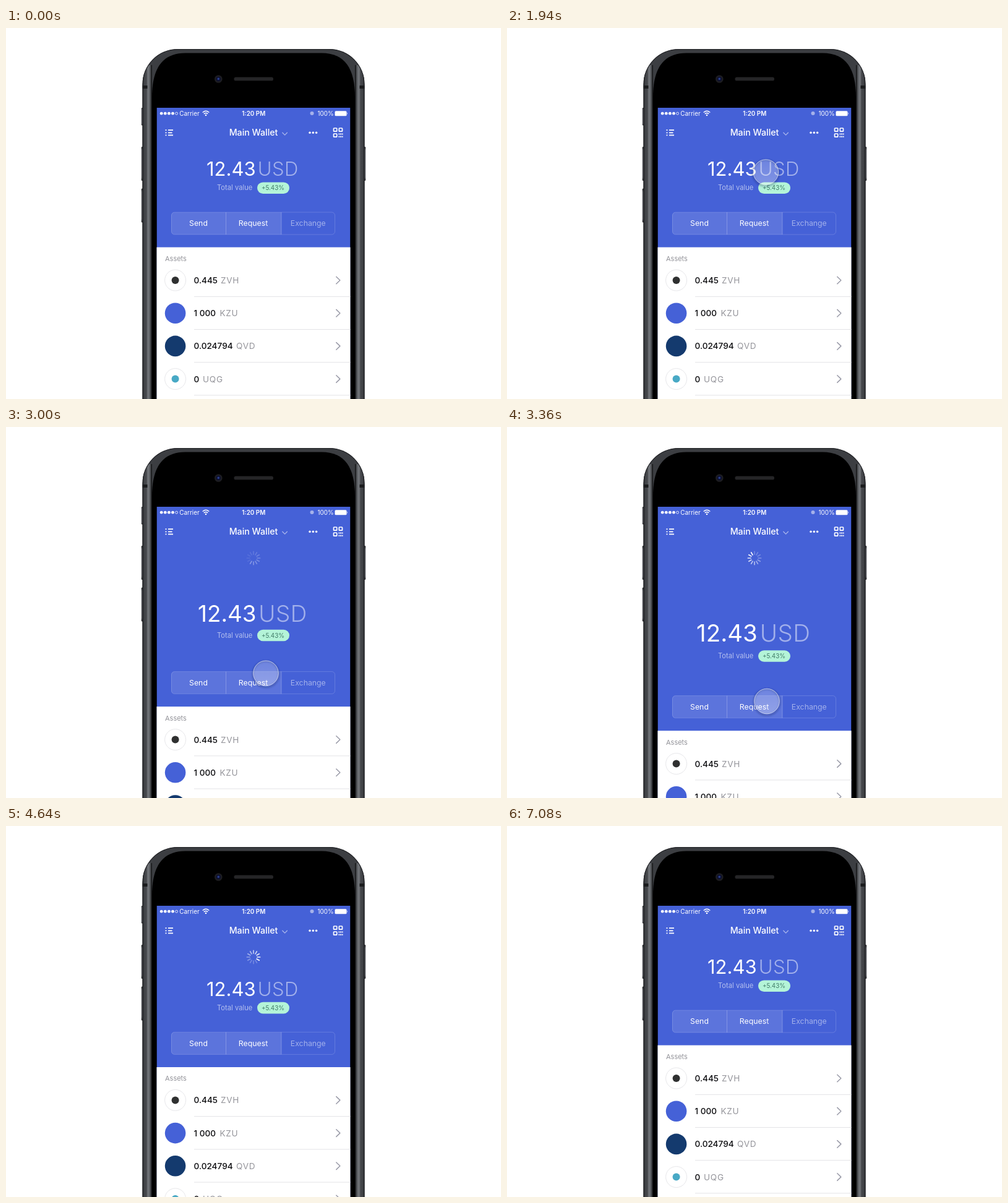
Animation of 800x600 px, one loop 7100 ms. Source, as an HTML page:

```html
<!DOCTYPE html>
<html lang="en">
<head>
<meta charset="utf-8">
<title>Wallet pull to refresh</title>
<style>
  html, body { margin: 0; width: 100%; height: 100%; overflow: hidden; background: #fff; }
  svg { display: block; width: 800px; height: 600px; }
  text { font-family: Inter, Roboto, "Liberation Sans", sans-serif; fill: #fff; white-space: pre; }
  .status { font-size: 9.9px; }
  .title { font-size: 14.2px; font-weight: 500; }
  .value { font-size: 31px; }
  .button { font-size: 12.3px; text-anchor: middle; }
  .amount { font-size: 13.6px; font-weight: 500; fill: #0b0b0e; }
  .ticker { font-size: 13.6px; fill: #95959b; letter-spacing: .7px; }
  .line { fill: none; stroke-linecap: round; stroke-linejoin: round; }
</style>
</head>
<body>
<svg viewBox="0 0 800 600">
  <defs>
    <linearGradient id="edge" x1="0" x2="1" y1="0" y2="0">
      <stop offset="0" stop-color="#232427"/>
      <stop offset=".2" stop-color="#404246"/>
      <stop offset=".42" stop-color="#46484c"/>
      <stop offset=".58" stop-color="#74777c"/>
      <stop offset=".78" stop-color="#5a5d61"/>
      <stop offset="1" stop-color="#0a0a0b"/>
    </linearGradient>
    <linearGradient id="key" x1="0" x2="0" y1="0" y2="1">
      <stop offset="0" stop-color="#17181a"/>
      <stop offset=".1" stop-color="#5d5f64"/>
      <stop offset=".9" stop-color="#5d5f64"/>
      <stop offset="1" stop-color="#17181a"/>
    </linearGradient>
    <linearGradient id="glass" x1="0" x2="0" y1="0" y2="1">
      <stop offset="0" stop-color="#fff" stop-opacity=".22"/>
      <stop offset="1" stop-color="#fff" stop-opacity=".32"/>
    </linearGradient>
    <filter id="soft" x="-50%" y="-50%" width="200%" height="200%">
      <feGaussianBlur stdDeviation="1.6"/>
    </filter>
    <clipPath id="screen"><rect x="243.5" y="129" width="313" height="471"/></clipPath>
    <clipPath id="body"><rect x="220.500" y="34" width="359" height="700" rx="57"/></clipPath>
    <g id="side">
      <rect x="220.500" y="60" width="15.500" height="560" fill="url(#edge)"/>
      <rect x="220.500" y="93" width="8" height="5" fill="#1a1b1d"/>
    </g>
  </defs>

  <!-- phone body -->
  <g fill="url(#key)">
    <rect x="218.700" y="129" width="4" height="28.500" rx="1.500"/>
    <rect x="218.700" y="192" width="4" height="55" rx="1.500"/>
    <rect x="218.700" y="259.500" width="4" height="55" rx="1.500"/>
    <rect x="577.300" y="192" width="4" height="55" rx="1.500"/>
  </g>
  <g clip-path="url(#body)">
    <rect x="220" y="34" width="360" height="600" fill="#3c3e42"/>
    <use href="#side"/>
    <use href="#side" transform="matrix(-1 0 0 1 800 0)"/>
    <rect x="221" y="34.500" width="358" height="699" rx="56.500" fill="none" stroke="#232427" stroke-width="1.400"/>
    <path d="M236 600V112C236 66 252 40.500 290 40.500H510C548 40.500 564 66 564 112V600z" fill="#000"/>
  </g>
  <circle cx="343.300" cy="82.500" r="6.300" fill="#1d1d21"/>
  <circle cx="343.300" cy="82.500" r="3.800" fill="#0d1130"/>
  <circle cx="343.300" cy="82.300" r="1.700" fill="#2b3f8f"/>
  <rect x="368.500" y="79.500" width="63.500" height="5.800" rx="2.900" fill="#252527"/>

  <g clip-path="url(#screen)">
    <rect x="243.500" y="129" width="313" height="471" fill="#4561d7"/>

    <!-- status bar -->
    <g id="signal" fill="#fff"></g>
    <text class="status" x="280.300" y="141.800">Carrier</text>
    <path class="line" d="M318.200 136.300q4.800-4.200 9.600 0M320.200 138.600q2.800-2.400 5.600 0" stroke="#fff" stroke-width="1.400"/>
    <circle cx="323" cy="141" r="1.300" fill="#fff"/>
    <text class="status" x="400.300" y="141.800" text-anchor="middle" font-weight="600">1:20 PM</text>
    <circle cx="494.500" cy="138" r="3" fill="#a5b1ea"/>
    <text class="status" x="503.500" y="141.800">100%</text>
    <rect x="531.500" y="134.300" width="19" height="8" rx="1.600" fill="#fff"/>
    <path d="M551.400 136.600q1.600 1.700 0 3.400z" fill="#fff"/>

    <!-- navigation bar -->
    <path d="M257.500 165.200h2M257.500 169.300h2M257.500 173.400h2M262 165.200h8M262 169.300h6.500M262 173.400h8"
      stroke="#fff" stroke-width="1.700"/>
    <text class="title" x="400" y="174.300" text-anchor="middle">Main Wallet</text>
    <path class="line" d="M446.800 169.300l3.800 3.800 3.800-3.800" stroke="#a9b5ec" stroke-width="1.300"/>
    <g fill="#fff">
      <circle cx="491" cy="169.300" r="1.700"/>
      <circle cx="496.300" cy="169.300" r="1.700"/>
      <circle cx="501.600" cy="169.300" r="1.700"/>
    </g>
    <g fill="none" stroke="#fff" stroke-width="1.700">
      <rect x="529.500" y="162" width="5.200" height="5.200" rx=".8"/>
      <rect x="538.300" y="162" width="5.200" height="5.200" rx=".8"/>
      <rect x="529.500" y="171" width="5.200" height="5.200" rx=".8"/>
      <path d="M537.500 171.500h7M537.500 175.700h7" stroke-width="1.900" stroke-dasharray="1.800 .8"/>
    </g>

    <g id="spinner" class="line" stroke="#fff" stroke-width="1.700" transform="translate(400 212)"></g>

    <g id="value">
      <text class="value" x="324" y="239.200">12.43</text>
      <text class="value" x="406.800" y="239.200" font-weight="300" fill-opacity=".5" letter-spacing=".4">USD</text>
    </g>

    <g id="total">
      <text x="341" y="262.300" font-size="11.200" fill-opacity=".6">Total value</text>
      <rect x="406" y="249.400" width="52" height="18.600" rx="9.300" fill="#b4f4d8"/>
      <text x="413" y="262.200" font-size="9.800" style="fill:#3f7a66">+5.43%</text>
    </g>

    <g id="sheet">
      <path d="M445 298H272a5 5 0 0 0-5 5v26a5 5 0 0 0 5 5h173z" fill="#fff" fill-opacity=".12"/>
      <rect x="267.500" y="298" width="264" height="36" rx="5" fill="none" stroke="#fff" stroke-opacity=".16"/>
      <path d="M355.500 298v36M445 298v36" stroke="#fff" stroke-opacity=".24"/>
      <text class="button" x="311" y="320.300">Send</text>
      <text class="button" x="399.500" y="320.300">Request</text>
      <text class="button" x="488.300" y="320.300" fill-opacity=".5">Exchange</text>
      <rect x="243" y="354.600" width="314" height="400" fill="#fff"/>
      <text x="257" y="377" font-size="11" style="fill:#939399">Assets</text>
      <g id="rows"></g>
    </g>

    <g id="touch">
      <circle cy="1.500" r="21" fill="none" stroke="#16235f" stroke-opacity=".4" stroke-width="2.200" filter="url(#soft)"/>
      <circle r="20.300" fill="url(#glass)" stroke="#fff" stroke-opacity=".6"/>
    </g>
  </g>
</svg>

<script>
const LOOP = 7100;
const $ = id => document.getElementById(id);

function add(parent, tag, attrs, text) {
  const node = document.createElementNS("http://www.w3.org/2000/svg", tag);
  for (const key in attrs) node.setAttribute(key, attrs[key]);
  if (text) node.textContent = text;
  return parent.appendChild(node);
}

for (let i = 0; i < 5; i++) {
  const empty = i === 4;
  add($("signal"), "circle", {
    cx: 251.2 + i * 6.1, cy: 138.2, r: empty ? 2 : 2.4,
    fill: empty ? "none" : "#fff", stroke: empty ? "#fff" : "none", "stroke-width": .8
  });
}

// amount, ticker, ticker x, badge fill, mark fill
const assets = [
  ["0.445", "ZVH", 347, "#fff", "#2f3030"],
  ["1 000", "KZU", 345.5, "#4561d7", ""],
  ["0.024794", "QVD", 372, "#143a6e", ""],
  ["0", "UQG", 318, "#fff", "#48a9c5"]
];

assets.forEach(([amount, ticker, x, badge, mark], i) => {
  const y = 408 + i * 53.2;
  const rows = $("rows");
  add(rows, "circle", {
    cx: 273.6, cy: y, r: mark ? 17 : 16.8, fill: badge, stroke: mark ? "#e7e7ea" : "none"
  });
  if (mark) add(rows, "circle", { cx: 273.6, cy: y, r: 6, fill: mark });
  add(rows, "text", { class: "amount", x: 303.5, y: y + 5 }, amount);
  add(rows, "text", { class: "ticker", x, y: y + 5 }, ticker);
  add(rows, "path", {
    class: "line", d: `M533.8 ${y - 5.8}l6 5.800-6 5.800`, stroke: "#9a9ba8", "stroke-width": 1.5
  });
  add(rows, "path", { d: `M304 ${y + 26.3}h253`, stroke: "#e3e3e6" });
});

const ticks = Array.from({ length: 12 }, (_, i) =>
  add($("spinner"), "path", { d: "M0-6V-10.600", transform: `rotate(${i * 30})` }));

function ease(t, from, to) {
  const p = Math.min(1, Math.max(0, (t - from) / (to - from)));
  return p * p * (3 - 2 * p);
}

const mix = (a, b, p) => a + (b - a) * p;

function draw(t) {
  const pull = ease(t, 2160, 3360);
  const release = ease(t, 3520, 4160);
  const rest = 35.4 * (1 - ease(t, 5100, 5620));

  // Parts stretch apart while pulled and move together once released.
  const shift = (reach, power) => mix(reach * pull ** power, rest, release);
  const scale = mix(1 + .24 * pull, 1, release);

  $("sheet").setAttribute("transform", `translate(0 ${shift(136.6, 1.39)})`);
  $("total").setAttribute("transform", `translate(0 ${shift(111.8, 1.47)})`);
  $("value").setAttribute("transform",
    `translate(398.5 ${227.5 + shift(105, 1.49)}) scale(${scale}) translate(-398.5 -227.5)`);

  $("spinner").setAttribute("opacity", ease(t, 2880, 3180) * (1 - ease(t, 5060, 5280)));
  const head = Math.floor(t / 75) + 3;
  ticks.forEach((tick, i) => {
    const age = (head - i + 12) % 12;
    tick.setAttribute("opacity", Math.max(.25, 1 - age * .085));
  });

  const press = ease(t, 1600, 1860);
  const lift = ease(t, 3440, 3640);
  const size = mix(1.3, 1, press) + .2 * lift;
  const x = mix(418.3, 420, ease(t, 1860, 2500));
  $("touch").setAttribute("opacity", press * (1 - lift));
  $("touch").setAttribute("transform", `translate(${x} ${mix(233, 443.5, pull)}) scale(${size})`);
}

const start = performance.now();
function frame() {
  draw((performance.now() - start) % LOOP);
  requestAnimationFrame(frame);
}
draw(0);
requestAnimationFrame(frame);
</script>
</body>
</html>
```
